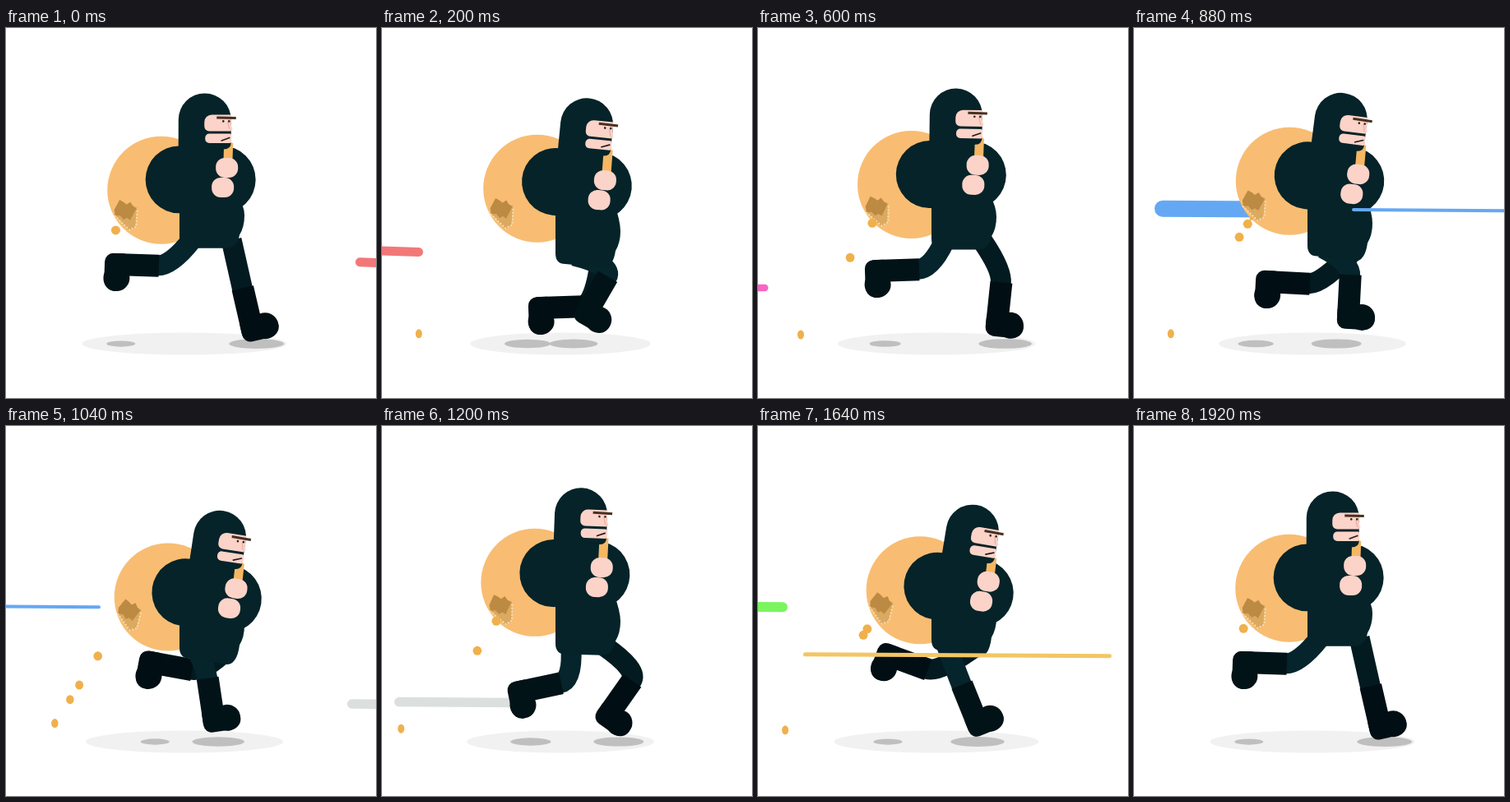
Animation, 450 px wide and 450 px high, one loop 1960 ms. Source, as an HTML page with a canvas:

```html
<!DOCTYPE html>
<html lang="en">
<head>
<meta charset="utf-8">
<title>Running thief</title>
<style>
html, body { margin: 0; width: 100%; height: 100%; overflow: hidden; background: #fff; }
canvas { display: block; width: 100vw; height: 100vh; }
</style>
</head>
<body>
<canvas id="stage" width="450" height="450"></canvas>
<script>
const c = document.getElementById('stage').getContext('2d');
const LOOP = 1960, STRIDE = 640, STEP = 40;
const DARK = '#052329', SKIN = '#fcd3c8', BAG = '#f8bd72';

// Key poses of each ankle over one stride: time, x, y, shin angle
const NEAR = [
  [0, 134, 287, 92], [200, 248, 347, 30], [240, 260, 352, 3],
  [360, 267, 363, -22], [560, 167, 323, 78], [600, 144, 295, 88]
];
const FAR = [
  [0, 299, 367, -13], [200, 192, 340, 88], [240, 162, 308, 93],
  [360, 158, 278, 110], [560, 274, 352, 35], [600, 290, 361, 6]
];

// Speed lines: time of entry, length, y, width, colour, in front, tilt
const STREAKS = [
  [-10, 125, 271, 11, '#f27878', false, .032],
  [365, 150, 316, 8.5, '#f765c3'],
  [710, 200, 219.5, 20, '#64a8f4'],
  [806, 250, 219.5, 4, '#64a8f4', true],
  [1026, 155, 335.5, 11.5, '#dbdfde'],
  [1416, 146, 220, 12, '#7af560'],
  [1482, 375, 277.3, 5, '#f3c565', true]
];
const DROPS = [-48, 360, 489, 574, 632, 814, 851, 875, 928, 1099, 1174, 1379, 1574, 1590, 1871];

const rad = deg => deg * Math.PI / 180;

// Strides repeat every 640 ms, steps every 320 ms
const strideWave = (p, peak) => Math.cos((p - peak) / STRIDE * 2 * Math.PI);
const stepWave = (p, peak) => strideWave(2 * p, 2 * peak);

// Smooth periodic interpolation through key poses
function pose(keys, p) {
  const n = keys.length;
  const at = i => {
    const [time, ...rest] = keys[(i + n) % n];
    return [time + Math.floor(i / n) * STRIDE, ...rest];
  };
  let i = n - 1;
  while (keys[i][0] > p) i--;
  const [a, b, d, e] = [at(i - 1), at(i), at(i + 1), at(i + 2)];
  const h = d[0] - b[0], u = (p - b[0]) / h;
  return [1, 2, 3].map(j => {
    const m0 = (d[j] - a[j]) / (d[0] - a[0]) * h, m1 = (e[j] - b[j]) / (e[0] - b[0]) * h;
    const rise = d[j] - b[j];
    return b[j] + u * (m0 + u * (3 * rise - 2 * m0 - m1 + u * (m0 + m1 - 2 * rise)));
  });
}

function fill(path, color) {
  c.fillStyle = color;
  c.fill(new Path2D(path));
}
function stroke(path, color, width, cap = 'round') {
  c.strokeStyle = color;
  c.lineWidth = width;
  c.lineCap = cap;
  c.stroke(new Path2D(path));
}
function oval(x, y, rx, ry, color) {
  c.fillStyle = color;
  c.beginPath();
  c.ellipse(x, y, rx, ry, 0, 0, 7);
  c.fill();
}
function box(x, y, w, h, r, color) {
  c.fillStyle = color;
  c.beginPath();
  c.roundRect(x, y, w, h, r);
  c.fill();
}
function placed(x, y, turn, draw) {
  c.save();
  c.translate(x, y);
  c.rotate(rad(turn));
  draw();
  c.restore();
}

function streaks(t, front) {
  for (const [enter, length, y, width, color, inFront = false, tilt = .006] of STREAKS) {
    if (inFront !== front) continue;
    const a = 450 - 2.5 * (t - enter) + width / 2, b = a + length - width;
    if (a < 470 && b > -20) stroke(`M${a} ${y + a * tilt}L${b} ${y + b * tilt}`, color, width);
  }
}

function footShadow([x, y], p) {
  const rx = 17.5 + Math.max(0, y - 287) * .2;
  oval(x + 15 * strideWave(p, 520), 384, rx, 1 + rx * .15, '#bfbfbf');
}

function leg([x, y, angle], hipX, hipY, thigh, boot) {
  const s = Math.sin(rad(angle)), k = Math.cos(rad(angle));
  const along = d => `${x + s * d} ${y - k * d}`;
  stroke(`M${hipX} ${hipY}Q${along(67)} ${along(51)}`, thigh, 25, 'butt');
  placed(x, y, angle, () => {
    box(-13, -52, 27, 65, [0, 0, 12, 12], boot);
    box(-13, -12, 46, 26, [4, 15, 15, 12], boot);
    oval(17, -1, 16, 16, boot);
  });
}

function bag(x, y, turn) {
  oval(x, y, 65.5, 65.5, BAG);
  placed(x, y, turn, () => {
    fill('M-58 27L-49 11L-43 15L-30 20L-33 44L-41 48Z', '#dba960');
    fill('M-51 10L-46 13L-43 16L-38 13L-35 18L-31 21L-39 35L-43 32L-47 34L-51 29L-57 29L-58 22Z', '#bd8a43');
    c.setLineDash([2, 2]);
    stroke('M-58 29L-40 47L-32 43L-30 23', '#f6deb4', 2, 'butt');
    c.setLineDash([]);
  });
}

function torso(y, b, drop) {
  fill(`M211 ${y}V${b - 13}Q211 ${b} 223 ${b}L268 ${b + drop}Q281 ${b + drop} 284 ${b - 16}
    Q290 ${b - 26} 290 ${b - 40}Q290 ${b - 52} 282 ${y + 25}V${y}Z`, DARK);
}

function head() {
  fill('M209 165V110A32 32 0 0 1 273 110V138Q273 146 264 146H240V165Z', DARK);
  box(240.5, 104, 32.5, 20, [9, 0, 0, 6], SKIN);
  box(241.5, 127, 32, 11.5, [5, 2, 2, 5], SKIN);
  fill('M271 112L275 122H268Z', SKIN);
  stroke('M269 113L271 121', '#eeb0a6', 1.4);
  oval(263.5, 112, 1.3, 1.4, '#30231f');
  oval(270.5, 112, 1.3, 1.4, '#30231f');
  stroke('M255.5 107.5L279 108', '#4a3020', 3, 'butt');
  stroke('M261.5 135.5L271 132', '#231b1b', 1.7);
}

function coins(t) {
  for (const born of DROPS) {
    const age = t - born;
    if (age < 0 || age > 310) continue;
    const fall = Math.min(1, (age / 240) ** 1.4), bounce = Math.max(0, age - 240);
    const r = 5.5 * Math.min(1, .25 + age / 30);
    oval(143 - 91 * fall - .9 * bounce, 231 + 142 * fall - .15 * bounce,
      r * (1 - .27 * fall * fall), r, '#f0b04c');
  }
}

function draw(t) {
  const p = t % STRIDE;
  const near = pose(NEAR, p), far = pose(FAR, p);
  const lean = 4.7 - 4.7 * strideWave(p, 20);
  const sway = .55 * lean + 3 * stepWave(p, 70);
  const y = 190.5 - 13 * stepWave(p, 265);
  const hip = 280 + 12.5 * stepWave(p, 150);
  const spread = 24 - (hip - 268) * .4;
  const handX = 268 + sway + lean * .5;
  const handY = 179 + lean * 1.1 + 13 * stepWave(p, 120);

  c.fillStyle = '#fff';
  c.fillRect(0, 0, 450, 450);
  oval(217, 384, 117 + 8 * stepWave(p, 20), 13.5, '#f1f1f1');
  footShadow(far, p);
  footShadow(near, p);
  streaks(t, false);
  bag(188 + sway * 1.2, y + 13 - lean * .8, 1.5 * (sway - 2));
  coins(t);
  leg(far, 250 + spread, hip - 10, '#031a20', '#010f14');
  leg(near, 250 - spread, hip - 10, '#05242b', '#021318');
  torso(y, hip, Math.max(0, lean - 1));

  // The upper body leans around the rear shoulder; the rope runs from fist to chin
  const s = Math.sin(rad(lean)), k = Math.cos(rad(lean));
  const pivotX = 208 + sway, pivotY = y + 5;
  const chinX = pivotX + 62 * k + 50 * s, chinY = pivotY + 62 * s - 50 * k;
  placed(pivotX, pivotY, lean, () => stroke('M2 -5H54', DARK, 82));
  stroke(`M${handX + 1} ${handY}L${chinX} ${chinY}`, '#f5b763', 11, 'butt');
  placed(pivotX, pivotY, lean, () => {
    c.translate(-208, -188);
    head();
  });
  const hand = () => box(-13.5, -12, 27, 24, 11, SKIN);
  placed(handX, handY, lean, hand);
  placed(handX - 5 - lean * .4, handY + 24, lean, hand);
  streaks(t, true);
}

const start = performance.now();
function tick() {
  const t = (performance.now() - start) % LOOP;
  draw(Math.floor(t / STEP) * STEP);
  requestAnimationFrame(tick);
}
tick();
</script>
</body>
</html>
```
